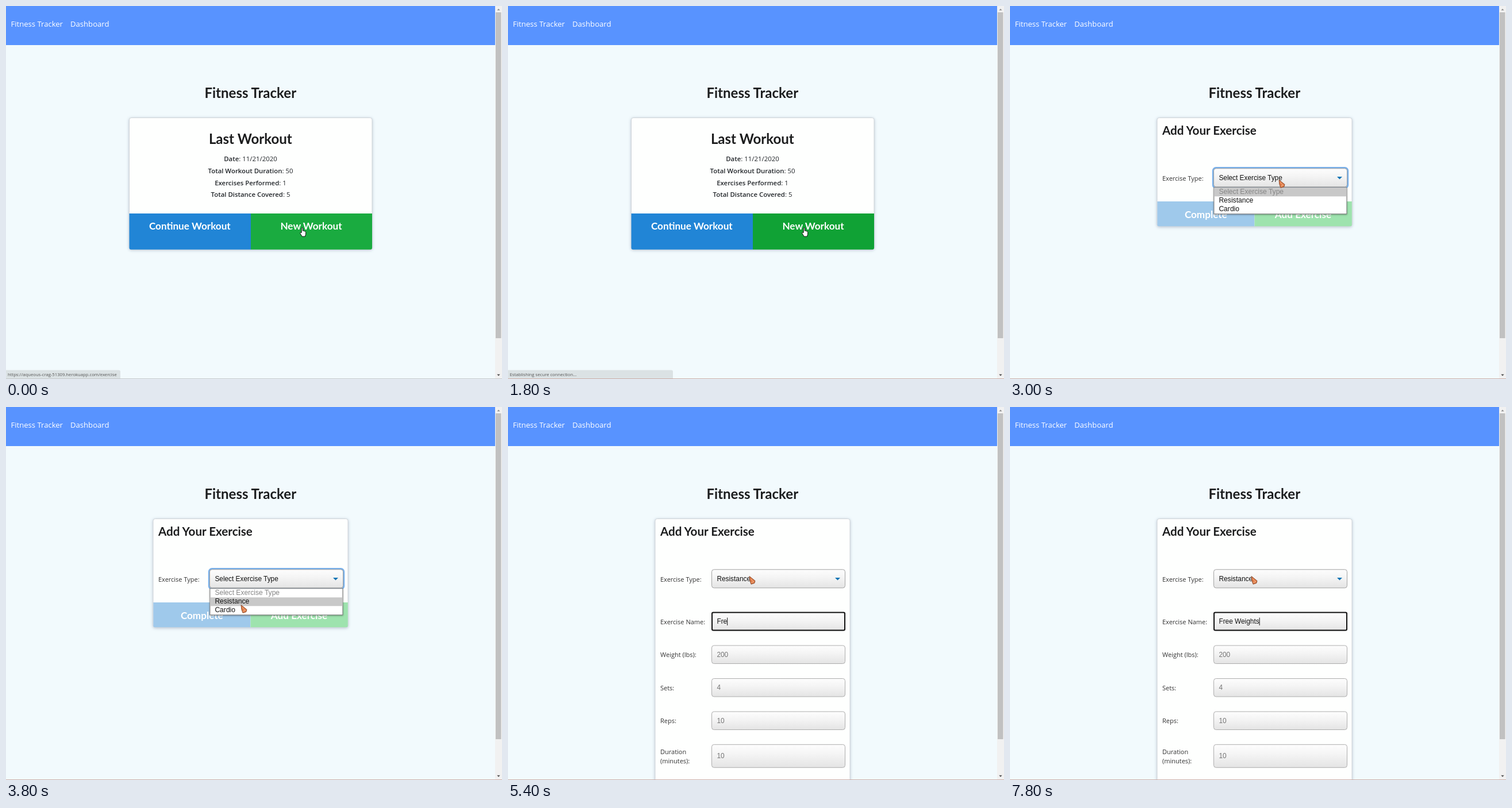
These frames come from a looping animation (863 px wide and 649 px high, 8000 ms). An HTML page:

```html
<!DOCTYPE html>
<html lang="en">
<head>
<meta charset="utf-8">
<title>Fitness Tracker</title>
<style>
  html, body { margin: 0; width: 100%; height: 100%; overflow: hidden; background: #f2fafd; }
  svg { display: block; }
  text { white-space: pre; font-family: "Open Sans", "Noto Sans", sans-serif; fill: #212529; }
  .nav { font-size: 13.1px; fill: #fff; }
  .heading, .button { font-family: Lato, sans-serif; font-weight: 700; }
  .heading { font-size: 24px; fill: #1b1c1d; }
  .small { font-size: 20.57px; }
  .button { font-size: 17.14px; fill: #fff; }
  .middle { text-anchor: middle; }
  .detail { font-size: 11.4px; text-anchor: middle; }
  .detail tspan { font-weight: 600; }
  .label { font-size: 11px; fill: #333; }
  .value { font: 11.85px "Liberation Sans", Arial, sans-serif; fill: #111; }
  .hint { fill: #757575; }
  .option { font-size: 12.1px; }
  .status { font-size: 7.7px; fill: #555; }
  .card { fill: #fefffe; stroke: #d0d5da; filter: drop-shadow(0 1.5px 2.5px #4a5a7a55); }
  .field { fill: url(#fieldFill); stroke: #adadad; }
</style>
</head>
<body>
<svg width="863" height="649" viewBox="0 0 863 649">
  <defs>
    <linearGradient id="fieldFill" x2="0" y2="1">
      <stop stop-color="#fdfdfd"/><stop offset=".4" stop-color="#f5f5f5"/><stop offset="1" stop-color="#e4e4e4"/>
    </linearGradient>
  </defs>
  <rect width="863" height="649" fill="#f2fafd"/>
  <rect width="851" height="68" fill="#5893ff"/>
  <text class="nav" x="8.5" y="35.5">Fitness Tracker</text>
  <text class="nav" x="112" y="35.5">Dashboard</text>
  <text class="heading middle" x="425.3" y="159.5">Fitness Tracker</text>

  <g id="home">
    <rect class="card" x="214.5" y="194.5" width="422.5" height="229" rx="3.5"/>
    <text class="heading middle" x="425.3" y="239.5">Last Workout</text>
    <text class="detail" x="425.5" y="270.3"><tspan>Date</tspan>: 11/21/2020</text>
    <text class="detail" x="425.5" y="291"><tspan>Total Workout Duration</tspan>: 50</text>
    <text class="detail" x="425.5" y="311.5"><tspan>Exercises Performed</tspan>: 1</text>
    <text class="detail" x="425.5" y="332"><tspan>Total Distance Covered</tspan>: 5</text>
    <path d="M214.5 361H426V423.7H217.5Q214.5 423.7 214.5 420.7Z" fill="#2185d6"/>
    <path id="newWorkout" d="M426 361H637V420.7Q637 423.7 634 423.7H426Z"/>
    <text class="button middle" x="319.8" y="388.5">Continue Workout</text>
    <text class="button middle" x="531" y="388.5">New Workout</text>
  </g>

  <g id="exercise">
    <rect id="exerciseCard" class="card" x="256" y="194.5" width="339" height="189" rx="3.5"/>
    <text class="heading small" x="265" y="223.5">Add Your Exercise</text>
    <text class="label" x="265" y="303.5">Exercise Type:</text>
    <rect id="focusRing" x="353.3" y="281.5" width="234.4" height="35" rx="5" fill="none" stroke="#78b0ea" stroke-width="3"/>
    <rect class="field" x="354.5" y="282.8" width="232" height="32" rx="4" style="stroke:#a2a2a2"/>
    <text id="type" class="value" x="363.4" y="303"></text>
    <path d="M569 297H578L573.5 301.6Z" fill="#0f73b4"/>
    <g id="actions">
      <path d="M256.3 340H425.5V383.3H259Q256.3 383.3 256.3 380.3Z" fill="#9fc9eb"/>
      <path d="M425.5 340H594.8V380.3Q594.8 383.3 592 383.3H425.5Z" fill="#9ee3ae"/>
      <text class="button middle" x="340.8" y="368.5">Complete</text>
      <text class="button middle" x="510" y="368.5">Add Exercise</text>
    </g>
    <g id="form">
      <g id="fields"></g>
      <rect id="nameFocus" x="355" y="357.6" width="231" height="31" rx="2" fill="none" stroke="#101010" stroke-width="2"/>
      <path id="caret" d="M0 366.5V380" stroke="#111"/>
    </g>
    <g id="menu">
      <rect x="354.9" y="315.8" width="231" height="46" fill="#fff" stroke="#7b7b7b" style="filter:drop-shadow(0 1.5px 1.5px #0005)"/>
      <rect id="highlight" x="355.4" width="230" height="15" fill="#c8c8c8"/>
      <text class="value option hint" x="363.4" y="327" style="fill:#858585">Select Exercise Type</text>
      <text class="value option" x="363.4" y="342">Resistance</text>
      <text class="value option" x="363.4" y="357">Cardio</text>
    </g>
  </g>

  <rect x="851" width="12" height="649" fill="#f1f1f1"/>
  <rect x="852" y="11" width="9.5" height="567" fill="#c1c1c1"/>
  <path d="M854.5 7.5H859.5L857 4.8Z" fill="#8a8a8a"/>
  <path d="M854.3 640.8H859.7L857 643.7Z" fill="#505050"/>

  <g id="status">
    <path id="statusBar" fill="#dbe2e4"/>
    <text id="statusText" class="status" x="3" y="644"></text>
  </g>
  <rect id="bottomLine" y="648" width="863" height="1"/>

  <path id="hand" transform="translate(511 385)" fill="#fff" stroke="#111" stroke-linejoin="round"
    d="M3.2 9.5V2Q3.2.8 4.3.8T5.4 2V6.2Q6.6 5.4 7.2 6.6Q8.4 6 8.9 7.2Q10.4 6.8 10.6 8.4V12L9.4 16H4.2L.8 10.6Q.4 9 2 8.8Z"/>
  <g id="pointer">
    <path d="M0 .5L10 8.5L8.8 12.5L3 14.3L.8 8Z" fill="#df7a45" stroke="#81442a" stroke-width=".9" stroke-linejoin="round"/>
    <path d="M2.2 5L7 9.5M3 11.5L7.8 9.8" stroke="#f6c09c" stroke-width=".9"/>
  </g>
</svg>
<script>
const LOOP = 8000, STEP = 200;
const TYPED = "Free Weights";
const $ = id => document.getElementById(id);
const show = (id, on) => { $(id).style.display = on ? "" : "none"; };
const clamp = (v, lo, hi) => Math.min(hi, Math.max(lo, v));

// label, top, height, placeholder
const fields = [
  ["Exercise Name:", 357.5, 31.5, "Bench Press"],
  ["Weight (lbs):", 415, 31.5, "200"],
  ["Sets:", 472.5, 31.5, "4"],
  ["Reps:", 530, 31.5, "10"],
  ["Duration\n(minutes):", 587.3, 40, "10"],
];
$("fields").innerHTML = fields.map(([label, top, height, hint], i) => {
  const middle = top + height / 2;
  const lines = label.split("\n");
  const labels = lines.map((line, n) =>
    `<text class="label" x="265" y="${middle + 4.5 + 16.5 * (n - (lines.length - 1) / 2)}">${line}</text>`).join("");
  return `${labels}<rect class="field" x="354.5" y="${top}" width="232" height="${height}" rx="4"/>
    <text id="field${i}" class="value hint" x="363.4" y="${middle + 3.8}">${hint}</text>`;
}).join("");

// time, x, y of the pointer tip
const path = [
  [2000, 511, 385], [2800, 468, 302], [3000, 468, 302], [3800, 409, 344],
  [4200, 409, 344], [4600, 416, 371], [4800, 416, 371], [5400, 420, 294], [LOOP, 420, 294],
];
function pointerAt(t) {
  const i = Math.max(1, path.findIndex(p => p[0] >= t));
  const [t0, x0, y0] = path[i - 1], [t1, x1, y1] = path[i];
  const k = clamp((t - t0) / (t1 - t0), 0, 1), ease = k * k * (3 - 2 * k);
  return [x0 + (x1 - x0) * ease, y0 + (y1 - y0) * ease];
}

function render(t) {
  const clicked = t >= 1400, home = t < 2000, expanded = t >= 4200, naming = t >= 4800;
  show("home", home);
  show("exercise", !home);
  $("newWorkout").setAttribute("fill", clicked ? "#10a235" : "#1aab40");

  show("status", t < 2600);
  const right = clicked ? 287 : 199;
  $("statusBar").setAttribute("d", `M0 633.5H${right - 3}Q${right} 633.5 ${right} 636.5V648H0Z`);
  $("statusText").textContent = clicked
    ? "Establishing secure connection..." : "https://aqueous-crag-51309.herokuapp.com/exercise";
  $("bottomLine").setAttribute("fill", clicked ? "#cbaea8" : "#c4c8ca");

  $("exerciseCard").setAttribute("height", expanded ? 500 : 189);
  $("type").textContent = expanded ? "Resistance" : "Select Exercise Type";
  show("actions", !expanded);
  show("form", expanded);
  show("menu", t >= 2800 && !expanded);
  show("focusRing", t >= 2800 && !naming);
  $("highlight").setAttribute("y", t < 3600 ? 316.3 : 331.3);

  // typing pauses for one step before the last three letters
  const count = clamp((t - 4800) / STEP - (t >= 6800 ? 1 : 0), 0, TYPED.length);
  const name = $("field0");
  name.textContent = count ? TYPED.slice(0, count) : fields[0][3];
  name.classList.toggle("hint", !count);
  show("nameFocus", naming);
  show("caret", naming);
  const caretX = 363.9 + (count ? name.getComputedTextLength() : 0);
  $("caret").setAttribute("transform", `translate(${caretX})`);

  show("hand", t <= 2000);
  show("pointer", t > 2000);
  $("pointer").setAttribute("transform", `translate(${pointerAt(t)})`);
}

function tick() {
  render(Math.floor(performance.now() % LOOP / STEP) * STEP);
  requestAnimationFrame(tick);
}
tick();
</script>
</body>
</html>
```
